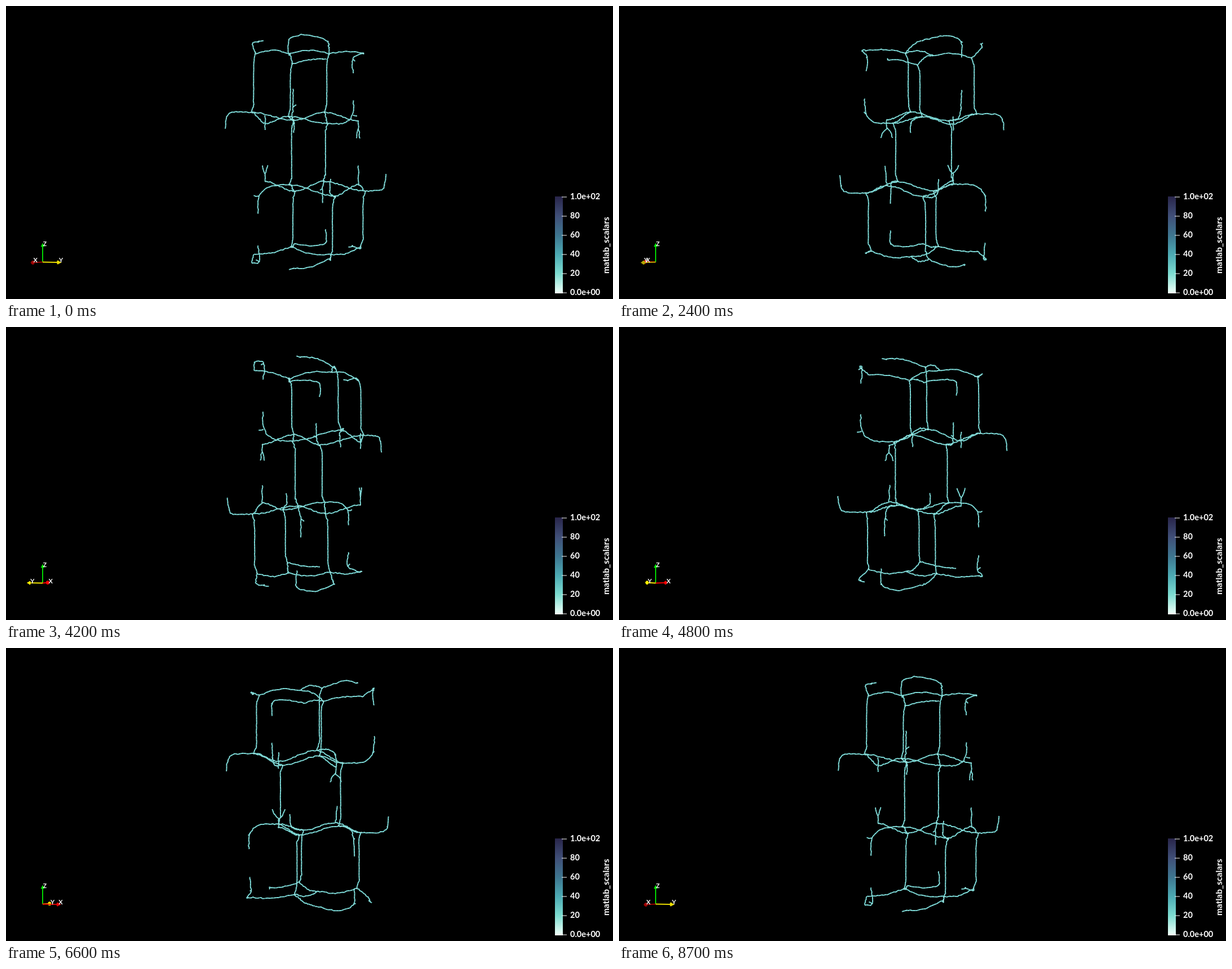
Write an HTML page with a canvas that moves like this. It is 1077 px wide and 520 px high and loops after 9 s.

```html
<!DOCTYPE html>
<html>
<head>
<meta charset="utf-8">
<style>
html, body { margin: 0; width: 100%; height: 100%; overflow: hidden; background: #000; }
canvas { display: block; }
</style>
</head>
<body>
<canvas id="stage" width="1077" height="520"></canvas>
<script>
const ctx = document.getElementById('stage').getContext('2d');
const CENTER = { x: 538.5, y: 260 }, CAMERA = 970;
const FRAME_MS = 300, FRAMES = 30;
const FONT = 'Lato, "Open Sans", sans-serif';

// Heights of the junction layers; the lower half mirrors the upper one.
const CAP = 178, TOP = 171, UPPER = 70, MIDDLE = 54;
const LEAN = 4, RIM = 0.85;

let seed = 7;
const random = () => (seed = (seed * 16807) % 2147483647) / 2147483647;
const jitter = size => (random() - 0.5) * size;
const mix = (p, q, t) => p.map((v, i) => v + (q[i] - v) * t);
const add = (p, x, y, z = 0) => [p[0] + x, p[1] + y, p[2] + z];
const atHeight = (p, z) => [p[0], p[1], z];
const mirror = p => p.map(v => -v);

// Points are [x, y, z]: x right, y toward the viewer, z up.
const curves = [];

function addPath(points) {
  const at = i => points[Math.max(0, Math.min(points.length - 1, i))];
  const out = [];
  for (let i = 0; i < points.length - 1; i++) {
    const [p, q, r, s] = [at(i - 1), at(i), at(i + 1), at(i + 2)];
    const steps = Math.max(1, Math.round(Math.hypot(r[0] - q[0], r[1] - q[1], r[2] - q[2]) / 4));
    const straight = Math.abs(r[2] - q[2]) > 40;
    for (let n = 0; n < steps; n++) {
      const t = n / steps;
      const spline = q.map((v, k) => v + 0.5 * t * (r[k] - p[k] +
        t * (2 * p[k] - 5 * v + 4 * r[k] - s[k] + t * (3 * (v - r[k]) + s[k] - p[k]))));
      out.push((straight ? mix(q, r, t) : spline).map(v => v + jitter(straight ? 0.6 : 1.8)));
    }
  }
  out.push(at(points.length - 1));
  curves.push(out);
}

function addPair(...points) {
  addPath(points);
  addPath(points.map(mirror));
}

// Lattice steps from a junction down to its three neighbours.
const STEPS = [[67, 34], [-67, 34], [0, -75]];
const down = (p, k, z) => [p[0] + STEPS[k][0], p[1] + STEPS[k][1], z];
const up = (p, k, z) => [p[0] - STEPS[k][0], p[1] - STEPS[k][1], z];
const rim = (p, z = p[2]) => [p[0] * RIM, p[1] * RIM, z];

function pillarPath(p, top, bottom) {
  const at = (lean, z) => [p[0] + lean, p[1] + lean, z];
  return [at(LEAN, top), at(1, top - 10), at(0, top - 20),
          at(0, bottom + 20), at(-1, bottom + 10), at(-LEAN, bottom)];
}

// Saddle-shaped link; a bulge turns it into an arch.
function link(from, to, bulge = 0) {
  const points = [];
  for (let i = 0; i <= 6; i++) {
    const t = i / 6, p = mix(from, to, t);
    const ease = bulge ? t : t * t * (3 - 2 * t);
    p[2] = from[2] + (to[2] - from[2]) * ease + bulge * Math.sin(Math.PI * t);
    points.push(p);
  }
  addPair(...points);
}

// Branch cut off near the boundary, ending in an upright tail and a short spur.
function looseEnd(from, site, bend, turn, tail) {
  const halfway = atHeight(mix(from, site, 0.5), bend);
  const end = rim(site, turn);
  addPair(from, halfway, end, add(end, end[0] * 0.02, end[1] * 0.02, tail));
  addPair(end, add(end, jitter(20), jitter(8), jitter(6)));
}

function buildNetwork() {
  const D = [-30, 55, MIDDLE], E = [30, -55, MIDDLE];
  const A = up(D, 0, UPPER), B = up(E, 0, UPPER), C = up(E, 2, UPPER);
  const lower = p => add(p, -LEAN, -LEAN);
  const cap = p => add(atHeight(p, TOP), LEAN, LEAN);

  [A, B, C].forEach(p => addPair(...pillarPath(p, TOP, UPPER)));
  [D, E].forEach(p => addPath(pillarPath(p, MIDDLE, -MIDDLE)));

  const hub = up(C, 0, CAP);
  [A, B, C].forEach(p => link(cap(p), hub, 6));
  const joint = p => add(p, LEAN, LEAN);
  [[A, D], [C, D], [B, E], [C, E]].forEach(([p, q]) => link(lower(p), joint(q)));

  // Roof
  looseEnd(cap(A), up(A, 2, CAP), 181, 180, 0);
  looseEnd(cap(B), up(B, 1, CAP), 182, 184, 0);
  for (const [k, next] of [[1, 2], [2, 1]]) {
    const site = up(C, k, CAP);
    link(cap(C), site, 4);
    looseEnd(site, down(site, next, CAP), 185, 178, -26);
  }

  // Middle layers
  looseEnd(lower(A), down(A, 1, UPPER), 69, 60, -20);
  looseEnd(lower(B), down(B, 2, UPPER), 69, 60, -20);
  looseEnd(joint(D), up(D, 2, MIDDLE), 56, 72, 28);
  looseEnd(joint(E), up(E, 1, MIDDLE), 56, 72, 28);

  const J = rim(down(A, 2, MIDDLE)), K = rim(down(C, 0, MIDDLE));
  link(lower(A), J);
  link(lower(B), J);
  link(lower(C), K);
  addPath([add(J, 0, 0, 14), add(J, 0, 0, -12)]);
  addPath([mirror(J), add(mirror(J), 0, 3, 32)]);

  const fork = add(K, 0, 0, -14);
  addPair(K, fork);
  for (const side of [-1, 1]) addPair(fork, add(fork, 2 * side, -6 * side, -6), add(fork, 4 * side, -11 * side, -16));
}

function project([x, y, z], cos, sin) {
  const scale = 1 / (1 - (y * cos + x * sin) / CAMERA);
  return [CENTER.x + (x * cos - y * sin) * scale, CENTER.y - z * scale];
}

function drawNetwork(angle) {
  const cos = Math.cos(angle), sin = Math.sin(angle);
  ctx.beginPath();
  for (const curve of curves) {
    curve.forEach((point, i) => {
      const [x, y] = project(point, cos, sin);
      i ? ctx.lineTo(x, y) : ctx.moveTo(x, y);
    });
  }
  ctx.lineJoin = 'round';
  ctx.lineWidth = 2;
  ctx.strokeStyle = '#6acdcb';
  ctx.stroke();
  ctx.setLineDash([2, 3]);
  ctx.lineWidth = 1;
  ctx.strokeStyle = 'rgba(215,245,240,0.7)';
  ctx.stroke();
  ctx.setLineDash([]);
}

function label(text, x, y, size, align = 'left') {
  ctx.font = `bold ${size}px ${FONT}`;
  ctx.textAlign = align;
  ctx.fillStyle = '#fff';
  ctx.fillText(text, x, y);
}

function drawArrow(dx, dy, color, facing) {
  const x = 65, y = 454.5, len = Math.hypot(dx, dy) || 1;
  const nx = -dy / len * 3.2, ny = dx / len * 3.2;
  const bx = x + dx * 0.8, by = y + dy * 0.8;
  ctx.strokeStyle = ctx.fillStyle = color;
  ctx.lineWidth = 1.8;
  ctx.beginPath();
  ctx.moveTo(x, y);
  ctx.lineTo(bx, by);
  ctx.stroke();
  ctx.beginPath();
  ctx.moveTo(bx + nx, by + ny);
  ctx.lineTo(x + dx, y + dy);
  ctx.lineTo(bx - nx, by - ny);
  ctx.fill();
  ctx.beginPath();
  ctx.ellipse(bx, by, 3.4 * Math.abs(facing), 3.4, 0, 0, Math.PI * 2);
  ctx.fill();
}

function drawAxes(angle) {
  const axes = [
    { name: 'X', phase: angle + Math.PI * 2 / 3, rgb: [255, 0, 0] },
    { name: 'Y', phase: angle + Math.PI / 6, rgb: [255, 240, 0] }
  ].map(axis => {
    const depth = Math.sin(axis.phase), scale = 34 / (1 - 0.25 * depth);
    return { ...axis, depth, dx: Math.cos(axis.phase) * scale, dy: depth * 1.3 };
  }).sort((a, b) => a.depth - b.depth);

  drawArrow(0, -34, '#00f000', 0.1);
  for (const { dx, dy, depth, rgb } of axes) {
    const shade = 1 - Math.max(0, depth - 0.4) * 0.8;
    drawArrow(dx, dy, `rgb(${rgb.map(v => Math.round(v * shade))})`, depth);
  }
  for (const { name, dx } of axes) label(name, 70 + dx * 0.82, 455, 11, 'center');
  label('Z', 69, 426, 10.5, 'center');
}

function drawLegend() {
  const top = 339, height = 170;
  const ramp = ctx.createLinearGradient(0, top + height, 0, top);
  ['#effff8', '#7ddcd0', '#4caab3', '#3e7690', '#404f78', '#29264b']
    .forEach((color, i) => ramp.addColorStop(i / 5, color));
  ctx.fillStyle = ramp;
  ctx.fillRect(974, top - 1, 14, height + 2);
  ['1.0e+02', '80', '60', '40', '20', '0.0e+00'].forEach((text, i) => {
    const y = top + i * height / 5;
    ctx.fillStyle = '#fff';
    ctx.fillRect(986, y - 0.5, 9, 1);
    label(text, 1001, y + 4, 14.5);
  });
  ctx.save();
  ctx.translate(1070, 475);
  ctx.rotate(-Math.PI / 2);
  label('matlab_scalars', 0, 0, 15.5);
  ctx.restore();
}

function render() {
  const step = Math.floor(performance.now() / FRAME_MS) % FRAMES;
  const angle = step / (FRAMES - 1) * Math.PI * 2;
  ctx.fillStyle = '#000';
  ctx.fillRect(0, 0, 1077, 520);
  drawNetwork(angle);
  drawAxes(angle);
  drawLegend();
  requestAnimationFrame(render);
}

buildNetwork();
render();
</script>
</body>
</html>
```
